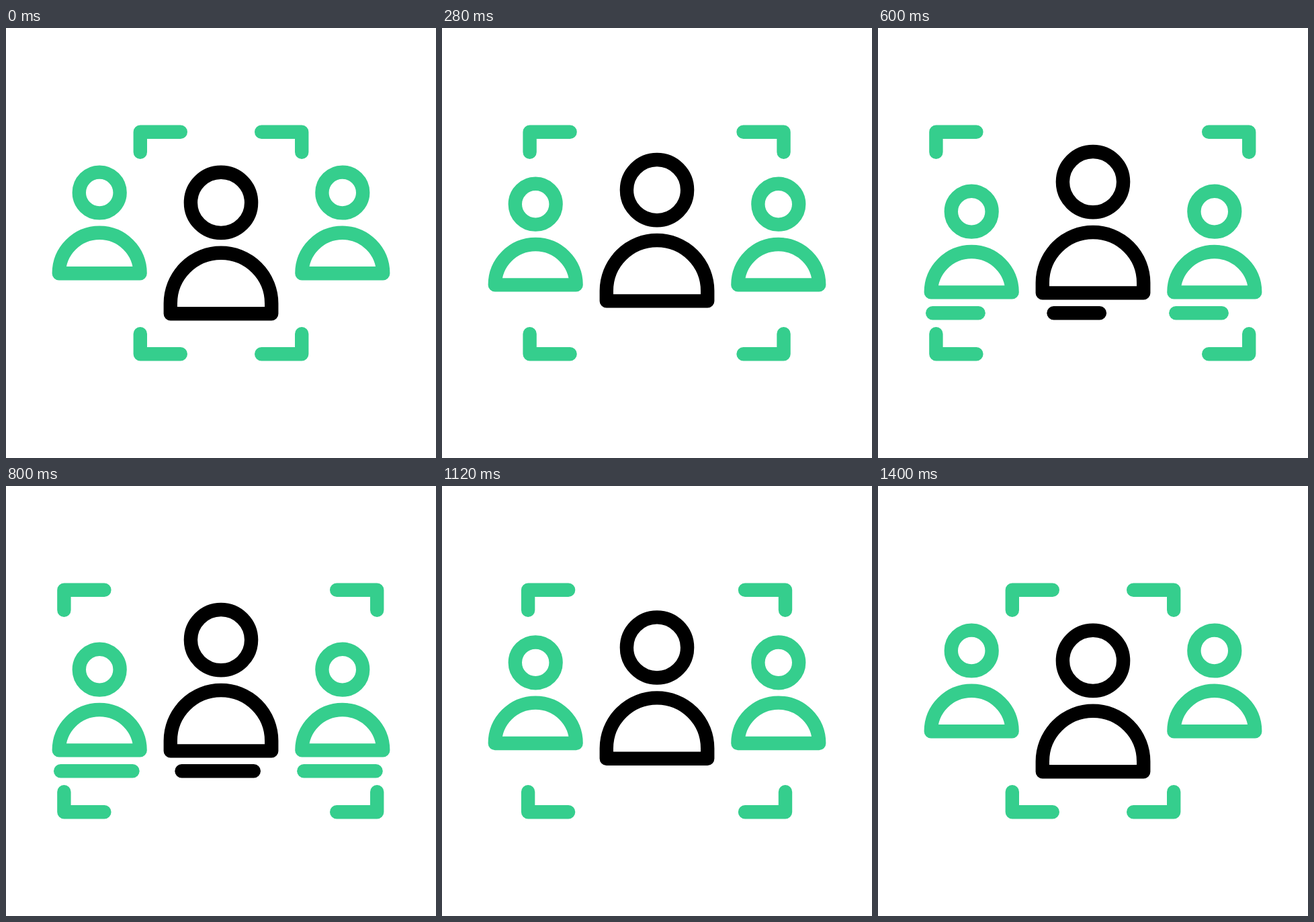
An HTML page that plays this animation: 640 by 640 pixels, repeating every 1440 ms.

```html
<!DOCTYPE html>
<html lang="en">
<head>
<meta charset="utf-8">
<title>Group focus</title>
<style>
  html, body { margin: 0; width: 100%; height: 100%; overflow: hidden; background: #fff; }
  svg { display: block; width: 100vw; height: 100vh; }
</style>
</head>
<body>
<svg viewBox="0 0 640 640" fill="none" stroke="#35ce8d" stroke-width="20.4" stroke-linecap="round" stroke-linejoin="round">
  <defs>
    <g id="person">
      <circle cy="245" r="30.4"/>
      <path d="M-60.4 365.2A60.4 60.4 0 0 1 60.4 365.2Z"/>
    </g>
  </defs>
  <path id="left" d="M199.8 184.7V154.8H259.8M199.8 455.2V485.2H259.8"/>
  <path id="right" d="M440.2 184.7V154.8H380.2M440.2 455.2V485.2H380.2"/>
  <g id="sides">
    <use href="#person" x="139.2"/>
    <use href="#person" x="500.8"/>
  </g>
  <g id="middle" stroke="#000">
    <circle cx="320" cy="259.9" r="45.1"/>
    <path d="M244.8 425.2V410A75.2 75.2 0 0 1 395.2 410V425.2Z"/>
  </g>
  <g id="bars">
    <path data-x="81.2"/>
    <path data-x="261.5" stroke="#000"/>
    <path data-x="443.3"/>
  </g>
</svg>
<script>
const LOOP = 1440, STEP = 40, HOLD = 200;
const el = id => document.getElementById(id);
const bars = document.querySelectorAll('#bars path');

// Smooth 0..1 ramp between two times
function ease(t, from, to) {
  const s = Math.min(1, Math.max(0, (t - from) / (to - from)));
  return s * s * (3 - 2 * s);
}

function move(id, x, y) {
  el(id).setAttribute('transform', `translate(${x} ${y})`);
}

function draw(t) {
  const spread = t < HOLD ? 0 : ease(t, 121, 398) - ease(t, 940, 1378);
  move('left', -113.4 * spread, 0);
  move('right', 112 * spread, 0);
  move('sides', 0, 28.2 * spread);
  move('middle', 0, -30.8 * spread);

  const length = 120.4 * (ease(t, 408, 760) - ease(t, 760, 955));
  for (const bar of bars) {
    bar.setAttribute('d', length > 0 ? `M${bar.dataset.x} 424.3h${length}` : '');
  }
}

const start = performance.now();
function tick() {
  const t = (performance.now() - start) % LOOP;
  draw(Math.floor(t / STEP) * STEP);
  requestAnimationFrame(tick);
}
tick();
</script>
</body>
</html>
```
